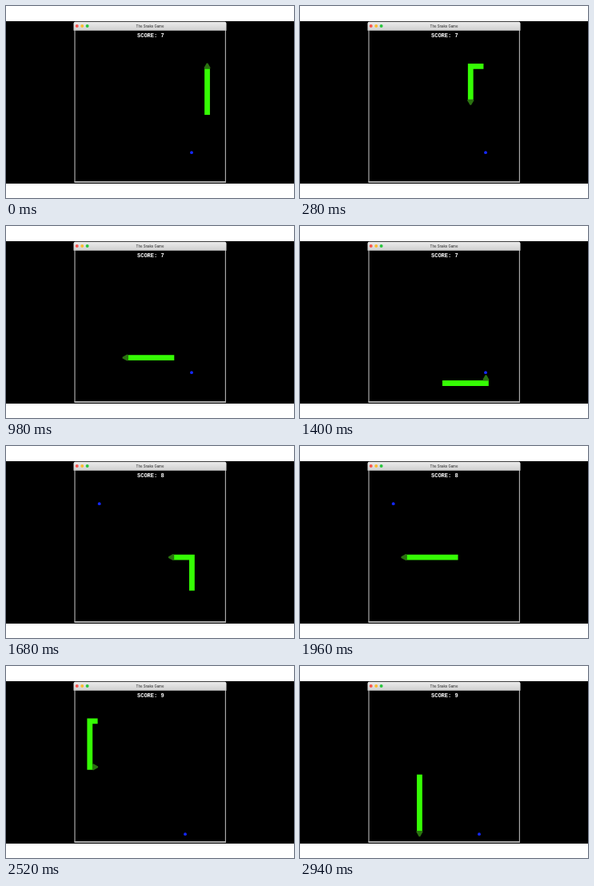
An HTML page that plays this animation: 360 px wide and 240 px high, repeating every 3.08 s.

```html
<!DOCTYPE html>
<html>
<head>
<meta charset="utf-8">
<title>The Snake Game</title>
<style>
  html, body { margin: 0; width: 100%; height: 100%; overflow: hidden; background: #fff; }
  svg { display: block; width: 360px; height: 240px; }
  .title { font: 500 4.3px Inter, "Liberation Sans", sans-serif; fill: #3a3a3a; }
  .score { font: bold 7px "Liberation Mono", monospace; fill: #fff; }
</style>
</head>
<body>
<svg viewBox="0 0 360 240">
  <defs>
    <linearGradient id="bar" x2="0" y2="1">
      <stop offset="0" stop-color="#ececec"/>
      <stop offset="1" stop-color="#cfcfcf"/>
    </linearGradient>
  </defs>
  <rect y="19" width="360" height="203"/>
  <path d="M86 30V220M274.4 30V220" stroke="#a8a8a8" stroke-width="1.2"/>
  <path d="M85.400 220H275" stroke="#aaa" stroke-width="2"/>
  <path d="M84.500 30.700V21.700q0-2 2-2H273.500q2 0 2 2V30.700z" fill="url(#bar)"/>
  <circle cx="88.700" cy="24.900" r="2" fill="#f9574f"/>
  <circle cx="95.200" cy="24.900" r="2" fill="#fbbb2e"/>
  <circle cx="101.600" cy="24.900" r="2" fill="#2ac63f"/>
  <text class="title" x="180" y="26.600" text-anchor="middle">The Snake Game</text>
  <text class="score" id="score" x="164" y="39"></text>
  <circle id="food" r="1.900" fill="#1428ff"/>
  <polyline id="body" fill="none" stroke="#35fd04" stroke-width="6.800" stroke-linecap="square"/>
  <polygon id="head" points="-3.300,-3.600 -1.800,-4 3.900,-.8 3.900,.8 -1.800,4 -3.300,3.600" fill="#2a7210"/>
</svg>
<script>
const CELL = 6.38, TICK = 140, TICKS = 22;
const ROUTE = 'U9 L6 D10 R7 D4 L17 D5 R13 U9 L16 U11 L4 D9 R7 D13';
const STEPS = '676666766766667666676'; // cells moved on each tick
const DIRS = { R: [1, 0, 0], D: [0, 1, 90], L: [-1, 0, 180], U: [0, -1, 270] };
const STAGES = [
  { from: 0, score: 7, food: [232, 183.2] },
  { from: 11, score: 8, food: [116.7, 72.2] },
  { from: 16, score: 9, food: [224, 210.2] }
];
const [score, food, body, head] =
  ['score', 'food', 'body', 'head'].map(id => document.getElementById(id));

const path = [{ x: 23, y: 10, angle: 270 }];
for (const leg of ROUTE.split(' ')) {
  const [dx, dy, angle] = DIRS[leg[0]];
  for (let n = +leg.slice(1); n > 0; n--) {
    const last = path[path.length - 1];
    path.push({ x: last.x + dx, y: last.y + dy, angle });
  }
}
const center = c => `${(104.8 + c.x * CELL).toFixed(2)},${(68.9 + c.y * CELL).toFixed(2)}`;

function draw(tick) {
  const stage = STAGES.filter(s => s.from <= tick).pop();
  const length = stage.score + 3;
  const at = [...STEPS.slice(0, tick)].reduce((sum, n) => sum + +n, 9);
  score.textContent = 'SCORE: ' + stage.score;
  food.setAttribute('cx', stage.food[0]);
  food.setAttribute('cy', stage.food[1]);
  body.setAttribute('points', path.slice(at - length + 1, at).map(center).join(' '));
  head.setAttribute('transform', `translate(${center(path[at])}) rotate(${path[at].angle})`);
}

const start = performance.now();
function loop() {
  draw(Math.floor((performance.now() - start) / TICK) % TICKS);
  requestAnimationFrame(loop);
}
loop();
</script>
</body>
</html>
```
